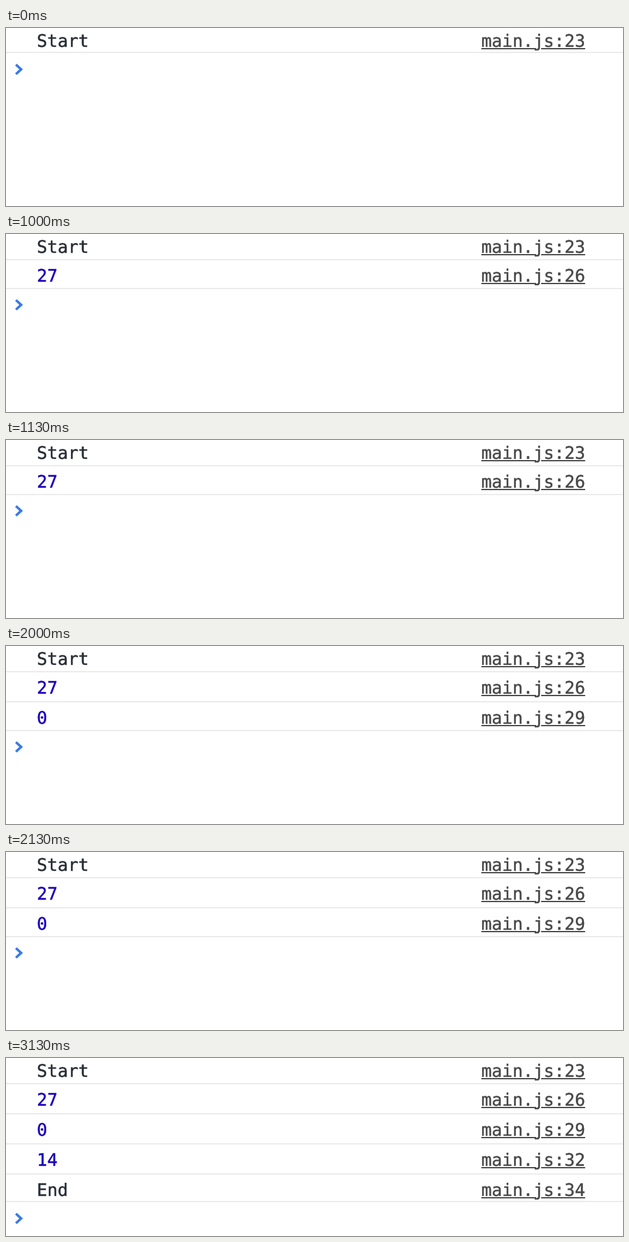
Animation, 980 px wide and 284 px high, one loop 3940 ms. Source, as an HTML page:

```html
<!DOCTYPE html>
<html lang="en">
<head>
<meta charset="utf-8">
<title>Console log</title>
<style>
  html, body { margin: 0; width: 100%; height: 100%; overflow: hidden; background: #fff; }
  #stage { position: relative; width: 980px; height: 284px; overflow: hidden; }
  .text {
    position: absolute;
    font: 27.4px/32px "DejaVu Sans Mono", monospace;
    text-rendering: geometricPrecision;
    -webkit-text-stroke: 0.5px currentColor;
    white-space: pre;
    color: #282d35;
  }
  .value { left: 49px; }
  .number { color: #1a00bd; }
  .link {
    left: 755px;
    color: #484848;
    text-decoration: underline 2px;
    text-underline-offset: 2px;
  }
  .rule { position: absolute; left: 0; width: 980px; height: 2px; background: #ebebeb; }
  #prompt { position: absolute; left: 0; top: 0; }
</style>
</head>
<body>
<div id="stage">
  <svg id="prompt" width="40" height="24" fill="none" stroke="#3a7ae6" stroke-width="4">
    <path d="M15.8 4.4 L24 12 L15.8 19.6"/>
  </svg>
</div>
<script>
const LOOP = 3940;
const stage = document.getElementById('stage');
const prompt = document.getElementById('prompt');

// value, source line, text baseline, separator top
const entries = [
  ['Start', 23, 30, 40],
  ['27', 26, 76, 88],
  ['0', 29, 124, 136],
  ['14', 32, 172, 184],
  ['End', 34, 220, 228],
];

// start time, visible rows, top of the last separator, prompt centre
const steps = [
  [0, 1, 38, 66],
  [1000, 2, 86, 113],
  [2000, 3, 134, 161],
  [3000, 5, 228, 256],
];

function add(parent, className, top, text = '') {
  const el = document.createElement('div');
  el.className = className;
  el.style.top = top + 'px';
  el.textContent = text;
  parent.append(el);
  return el;
}

const rows = entries.map(([value, line, baseline, ruleTop]) => {
  const row = document.createElement('div');
  const kind = isNaN(value) ? '' : ' number';
  add(row, 'text value' + kind, baseline - 24, value);
  add(row, 'text link', baseline - 24, 'main.js:' + line);
  const rule = add(row, 'rule', ruleTop);
  stage.append(row);
  return { row, rule, ruleTop };
});

function render(time) {
  const [, count, lastRule, promptY] = steps.findLast(([start]) => time >= start);
  rows.forEach(({ row, rule, ruleTop }, i) => {
    row.style.display = i < count ? 'block' : 'none';
    rule.style.top = (i === count - 1 ? lastRule : ruleTop) + 'px';
  });
  prompt.style.transform = `translateY(${promptY - 12}px)`;
}

const began = performance.now();
function tick() {
  render((performance.now() - began) % LOOP);
  requestAnimationFrame(tick);
}
tick();
</script>
</body>
</html>
```
